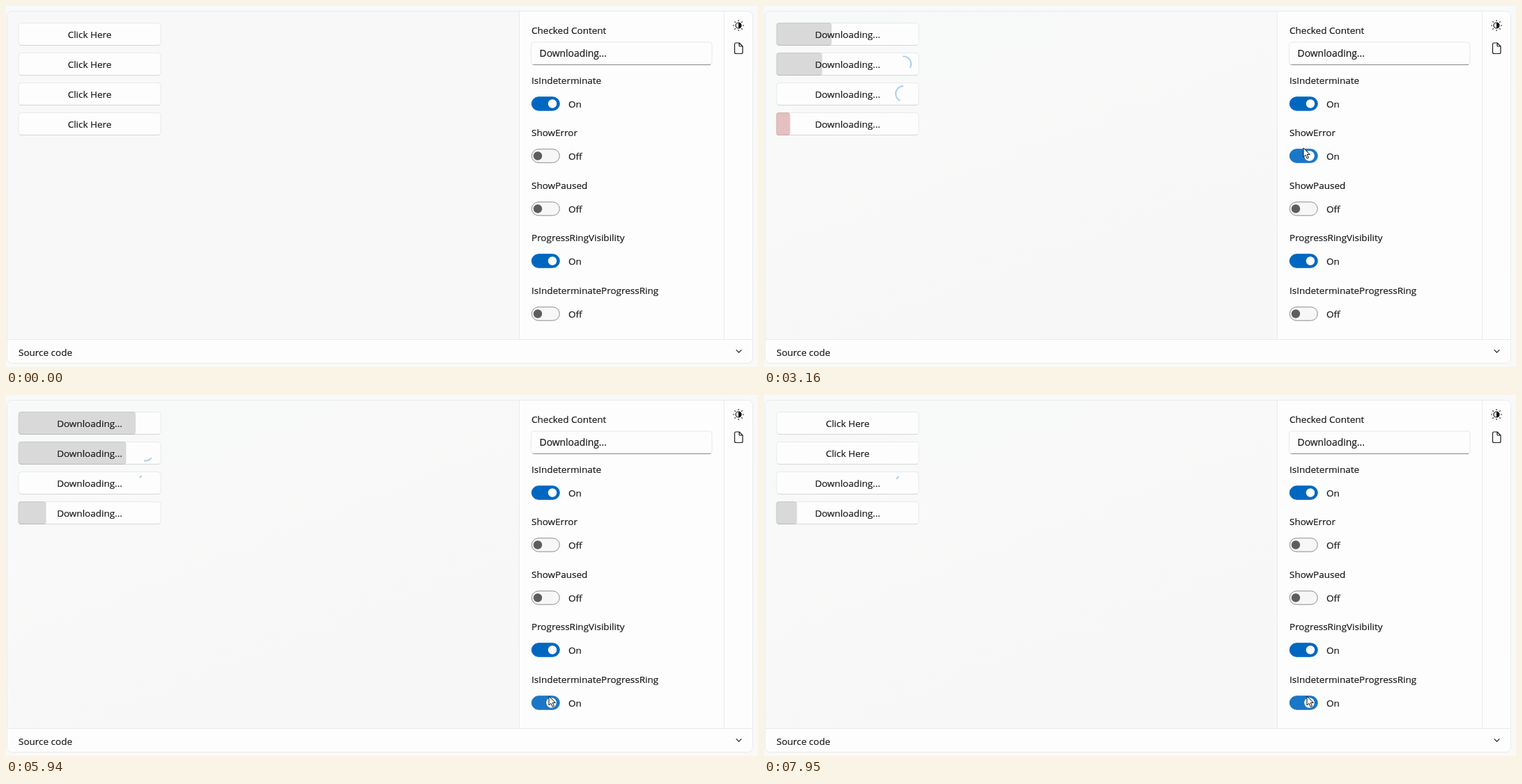
An HTML page that plays this animation: 1079x519 px, repeating every 8000 ms.

```html
<!DOCTYPE html>
<html lang="en">
<head>
<meta charset="utf-8">
<title>Progress buttons</title>
<style>
html, body { margin: 0; width: 100%; height: 100%; overflow: hidden; background: #f9f9f9; }
svg { display: block; width: 100%; height: 100%; }
text { font: 13.5px "Open Sans", "Noto Sans", sans-serif; fill: #1a1a1a; stroke: #1a1a1a; stroke-width: .2; }
.mid { text-anchor: middle; }
.field { font-size: 13.9px; }
.line { fill: none; stroke: #1b1b1b; stroke-width: 1.2; stroke-linecap: round; stroke-linejoin: round; }
.ring { fill: none; stroke: #afd1ed; stroke-width: 2.2; stroke-linecap: round; }
</style>
</head>
<body>
<svg viewBox="0 0 1079 519">
  <defs>
    <linearGradient id="outer" x2="0" y2="1">
      <stop stop-color="#f7f9fa"/><stop offset="1" stop-color="#faf9f6"/>
    </linearGradient>
    <linearGradient id="tint" x2=".6" y2="1">
      <stop stop-color="#f7faf9"/><stop offset=".4" stop-color="#f8f9f8"/>
      <stop offset=".6" stop-color="#f9f8f8"/><stop offset="1" stop-color="#f7f7f7"/>
    </linearGradient>
    <clipPath id="card"><rect x="1.5" y="7.5" width="1070" height="506" rx="7"/></clipPath>
  </defs>
  <rect width="1079" height="519" fill="url(#outer)"/>
  <g clip-path="url(#card)">
    <rect width="1079" height="519" fill="#f8f8f8"/>
    <rect id="mica" width="737" height="480" fill="url(#tint)"/>
    <path d="M737 7h342v512H0V479.500H737z" fill="#fdfdfd"/>
    <path d="M736.500 7V479M1030.500 7V479M0 479.500H1079" stroke="#ebebeb"/>
  </g>
  <rect x="1.500" y="7.500" width="1070" height="506" rx="7" fill="none" stroke="#eaeaea"/>
  <g id="fixed"></g>
  <g id="live"></g>
</svg>
<script>
const LOOP = 8000, W = 204;
const $ = id => document.getElementById(id);
const clamp = v => Math.max(0, Math.min(1, v));
const mod = (v, n) => ((v % n) + n) % n;
const label = (x, y, s, c = '') => `<text x="${x}" y="${y}" class="${c}">${s}</text>`;

const buttons = [
  { y: 24, from: 690, to: 7065 },
  { y: 67, from: 1115, to: 7490 },
  { y: 110, from: 1500, to: LOOP },
  { y: 153, from: 1800, to: LOOP }
];
const toggles = [
  { name: 'IsIndeterminate', y: 140.5, on: -999, off: 9999 },
  { name: 'ShowError', y: 215.5, on: 2907, off: 3430 },
  { name: 'ShowPaused', y: 291.5, on: 3954, off: 4735 },
  { name: 'ProgressRingVisibility', y: 366.5, on: -999, off: 9999 },
  { name: 'IsIndeterminateProgressRing', y: 442.5, on: 5642, off: 9999 }
];
// time, x, y of the pointer tip
const route = [
  [70, 1041, 483], [560, 125, 40], [750, 122, 40], [1050, 121, 83], [1180, 121, 83],
  [1440, 120, 126], [1560, 120, 126], [1690, 120, 166], [1860, 122, 168], [2460, 644, 244],
  [2530, 672, 235], [2820, 774, 204], [3500, 774, 204], [3860, 769, 287], [4190, 769, 288],
  [4260, 769, 291], [4780, 769, 291], [5030, 774, 377], [5400, 779, 433]
];

function box(x, y, w, h, edge) {
  return `<rect x="${x}" y="${y}" width="${w}" height="${h}" rx="4" fill="#fdfdfd" stroke="#e9e9e9"/>
    <path d="M${x + 2} ${y + h - .5}q1 .5 2 .5h${w - 8}q1 0 2-.5" fill="none" stroke="${edge}"/>`;
}

function fixedParts() {
  let s = label(754, 39.7, 'Checked Content') + box(753.5, 52, 259.5, 32.5, '#868686') +
    label(765.5, 72.7, 'Downloading...', 'field') + label(18, 502.500, 'Source code');
  for (const b of buttons) {
    s += box(18, b.y + .5, W, 32, '#d6d6d6') +
      `<clipPath id="c${b.y}"><rect x="17.5" y="${b.y}" width="${W + 1}" height="33" rx="4"/></clipPath>`;
  }
  for (const g of toggles) s += label(754, g.y - 28.700, g.name);
  for (let i = 0; i < 8; i++)
    s += `<path class="line" d="M1051 21.500v-1" transform="rotate(${i * 45} 1051 28)"/>`;
  return s + `<circle class="line" cx="1051" cy="28" r="4"/><path d="M1051 24a4 4 0 0 1 0 8z"/>
    <path class="line" d="M1052 53h-4.500q-2 0-2 2v11.500q0 2 2 2h7.500q2 0 2-2V58zV57q0 1 1 1h4"/>
    <path class="line" d="M1048 494.700l3.500 3.500 3.500-3.500"/>`;
}

// cubic-bezier(.4, 0, .6, 1), solved by bisection
function ease(x) {
  let a = 0, b = 1;
  for (let i = 0; i < 20; i++) {
    const u = (a + b) / 2, v = 1 - u;
    if (1.2 * v * v * u + 1.8 * v * u * u + u * u * u < x) a = u; else b = u;
  }
  return a * a * (3 - 2 * a);
}

function bar(b, x, w, fill = '#000', alpha = .14) {
  if (x + w <= 0 || x >= W) return '';
  return `<rect x="${17.5 + x}" y="${b.y}" width="${w + .5}" height="33" rx="4"
    fill="${fill}" fill-opacity="${alpha}" clip-path="url(#c${b.y})"/>`;
}

function sweep(b, t) {
  const [error, paused] = [toggles[1], toggles[2]];
  const start = [paused.off, paused.on, error.off, error.on].find(v => t >= v) ?? -93;
  const s = mod((t - start) / 1017, 2);
  const look = start === error.on ? ['#aa3232', .3] : start === paused.on ? ['#826746', .3] : [];
  return bar(b, W * (-.4 + 1.6 * ease(clamp(s / 1.5))), W * .4, ...look) +
    bar(b, W * (-.9 + 1.9 * ease(clamp((s - .75) / 1.25))), W * .6, ...look);
}

function arc(cy, from, to) {
  const at = d => `${200 + 11 * Math.sin(d * Math.PI / 180)} ${cy - 11 * Math.cos(d * Math.PI / 180)}`;
  return `<path class="ring" d="M${at(from)}A11 11 0 ${to - from > 180 ? 1 : 0} 1 ${at(to)}"/>`;
}

function spinner(cy, t, start) {
  const p = mod((t - start) / 2030, 1);
  return arc(cy, 900 * p + 360 * Math.max(0, p - .5), 900 * p + Math.min(180, 360 * p));
}

function button(b, i, t) {
  const busy = t >= b.from && t < b.to, done = (t - b.from) * .032;
  let s = '';
  if (busy) {
    if (i < 2) s += bar(b, 0, done);
    if (i === 1) s += t < toggles[4].on ? arc(83.5, 0, 360 * done / W) : spinner(83.5, t, toggles[4].on);
    if (i === 2) s += spinner(126, t, 1954);
    if (i === 3) s += sweep(b, t);
  }
  return s + label(120, b.y + 21.700, busy ? 'Downloading...' : 'Click Here', 'mid');
}

function toggle(g, t, [px, py]) {
  const on = t >= g.on && t < g.off;
  const hover = px > 753 && px < 796 && Math.abs(py - g.y) < 12;
  const k = clamp((t - g.on) / 100) - clamp((t - g.off) / 100);
  const fill = on ? (hover ? '#1a76c6' : '#0067c0') : (hover ? '#efefef' : '#f7f7f7');
  return `<rect x="754.3" y="${g.y - 9.7}" width="40" height="19.400" rx="9.700"
      fill="${fill}" stroke="${on ? fill : '#8a8a8a'}"/>
    <circle cx="${763 + k * (hover ? 19.5 : 21)}" cy="${g.y}" r="${hover ? 7.3 : 6.2}" fill="${on ? '#fff' : '#5d5d5d'}"/>` +
    label(807, g.y + 5.500, on ? 'On' : 'Off');
}

function pointer(t) {
  if (t < route[0][0]) return [-50, -50];
  const i = route.findIndex(r => r[0] > t);
  if (i < 0) return route.at(-1).slice(1);
  const [a, b] = [route[i - 1], route[i]], k = (t - a[0]) / (b[0] - a[0]);
  return [a[1] + (b[1] - a[1]) * k, a[2] + (b[2] - a[2]) * k];
}

function draw(now) {
  const t = now % LOOP, tip = pointer(t);
  $('mica').setAttribute('opacity', clamp((t - 70) / 300));
  $('live').innerHTML = buttons.map((b, i) => button(b, i, t)).join('') +
    toggles.map(g => toggle(g, t, tip)).join('') +
    `<path d="M0 0V13l3-2.700 2.200 5 2.200-1-2.200-4.800H9.300z" fill="#fff" stroke="#111"
      stroke-linejoin="round" transform="translate(${tip})"/>`;
}

$('fixed').innerHTML = fixedParts();
const begin = performance.now();
function tick() {
  draw(performance.now() - begin);
  requestAnimationFrame(tick);
}
tick();
</script>
</body>
</html>
```
